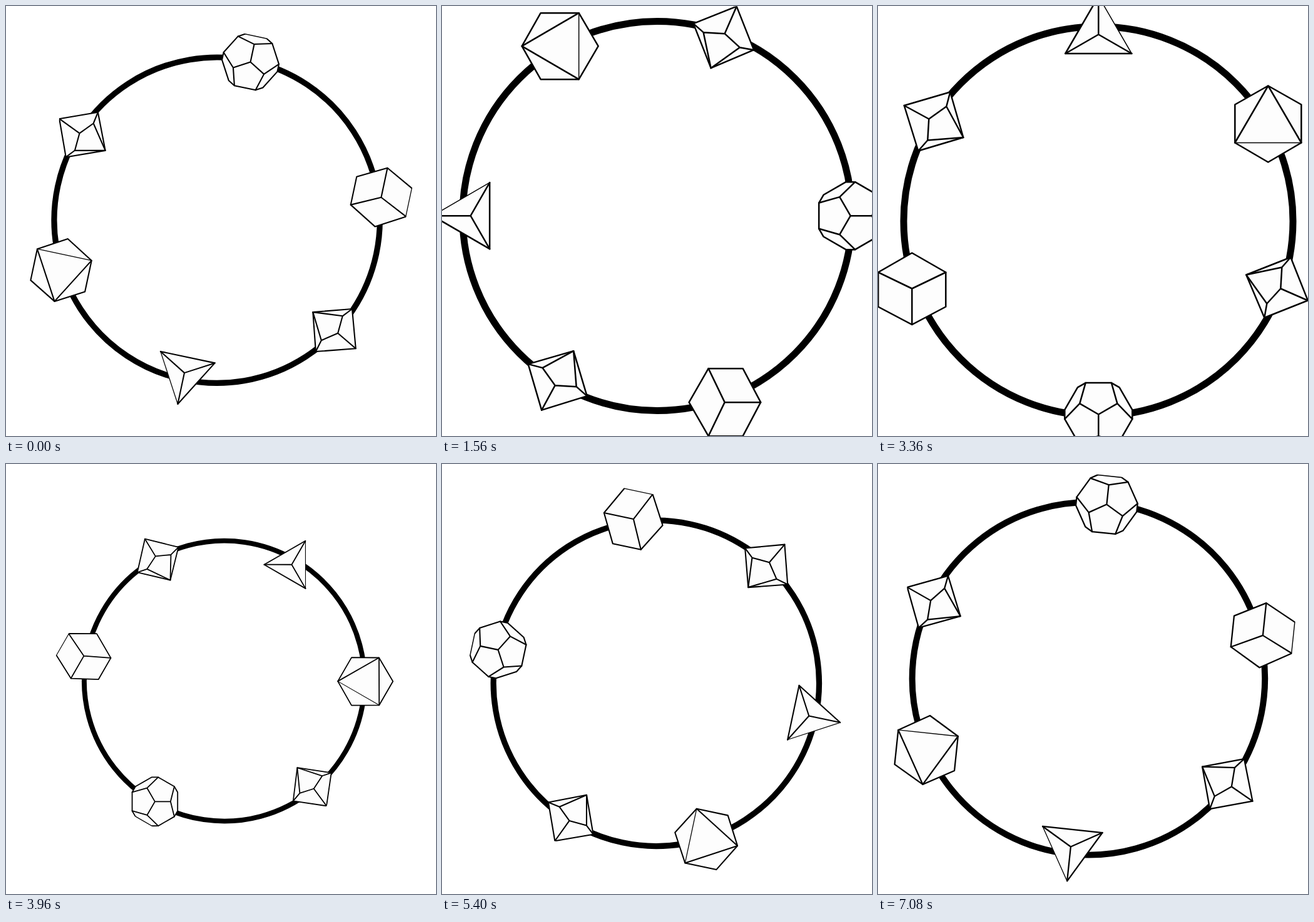
These frames come from a looping animation (687x687 px, 7.2 s). An HTML page:

```html
<!DOCTYPE html>
<html lang="en">
<head>
<meta charset="utf-8">
<title>Ring of dice</title>
<style>
  html, body { margin: 0; width: 100%; height: 100%; overflow: hidden; background: #fff; }
  svg { display: block; width: 100vw; height: 100vh; }
  #art path { fill: #fdfdfd; stroke: #000; stroke-width: 2.5; stroke-linejoin: round; stroke-linecap: round; }
  #art .line { fill: none; }
  #art .thin { fill: none; stroke-width: 1.5; }
  #ring { fill: none; stroke: #000; stroke-width: 11; }
</style>
</head>
<body>
<svg viewBox="0 0 687 687">
  <clipPath id="sheet"><rect x="0" y="-16.5" width="687" height="720"/></clipPath>
  <g id="art">
    <g clip-path="url(#sheet)">
      <circle id="ring" cx="352" cy="343.7" r="311"/>

      <g transform="translate(.3 .5)">
        <!-- four sides -->
        <path d="M405 75.5H299L352 -16"/>
        <path class="thin" d="M352 -16L405 75.5"/>
        <path class="line" d="M352 45V-16M352 45L299 75.5M352 45L405 75.5"/>

        <!-- twenty sides -->
        <path d="M623 127L676 157V218L623 249L570 218V157Z"/>
        <path class="line" d="M570 218L623 127L676 218"/>
        <path class="thin" d="M570 218H676"/>

        <!-- ten sides, right and left -->
        <path d="M588 429L659 401L686.5 470L617 497.5Z"/>
        <path class="line" d="M588 429L645 417L643 451L621 475ZM645 417L659 401M643 451L686.5 470M621 475L617 497.5"/>
        <path d="M136 209.5L64 231L41.5 158.5L115 137Z"/>
        <path class="line" d="M136 209.5L109 160L81 180L79 214ZM109 160L115 137M81 180L41.5 158.5M79 214L64 231"/>

        <!-- six sides -->
        <path d="M54 394L108 425V480L54 508.5L0 480V425Z"/>
        <path class="line" d="M54 451L0 425M54 451L108 425M54 451V508.5"/>

        <!-- twelve sides -->
        <path id="shell"/>
        <path id="spokes" class="line"/>
      </g>
    </g>
  </g>
</svg>
<script>
  const $ = id => document.getElementById(id);
  const RAD = Math.PI / 180;

  function buildDodecahedron(cx, cy) {
    const at = (r, deg) =>
      (cx + r * Math.cos(deg * RAD)).toFixed(2) + ' ' + (cy + r * Math.sin(deg * RAD)).toFixed(2);
    const R = 54.5, INNER = 34.7, NEAR = 37.76, FAR = 22.24;
    const rim = [];
    let spokes = '';
    for (const a of [-150, -30, 90]) {
      for (const d of [-NEAR, -FAR, FAR, NEAR]) rim.push(at(R, a + d));
      spokes += `M${cx} ${cy}L${at(INNER, a)}`;
      spokes += `M${at(R, a - NEAR)}L${at(INNER, a)}L${at(R, a + NEAR)}`;
    }
    $('shell').setAttribute('d', 'M' + rim.join('L') + 'Z');
    $('spokes').setAttribute('d', spokes);
  }

  const STEP = 120, STEPS = 60, UPRIGHT = 28;
  const PX = 343.8, PY = 343.65, ASPECT = 718 / 687;

  // The turned sheet's bounding box is scaled to cover the square stage.
  function pose(step) {
    const angle = (step - UPRIGHT) * 360 / STEPS;
    const c = Math.abs(Math.cos(angle * RAD)), s = Math.abs(Math.sin(angle * RAD));
    const scale = 1 / (Math.max(c, s) + ASPECT * Math.min(c, s));
    $('art').setAttribute('transform',
      `translate(${PX} ${PY}) scale(${scale}) rotate(${angle}) translate(${-PX} ${-PY})`);
  }

  function tick() {
    pose(Math.floor(performance.now() / STEP) % STEPS);
    requestAnimationFrame(tick);
  }

  buildDodecahedron(352, 652);
  tick();
</script>
</body>
</html>
```
